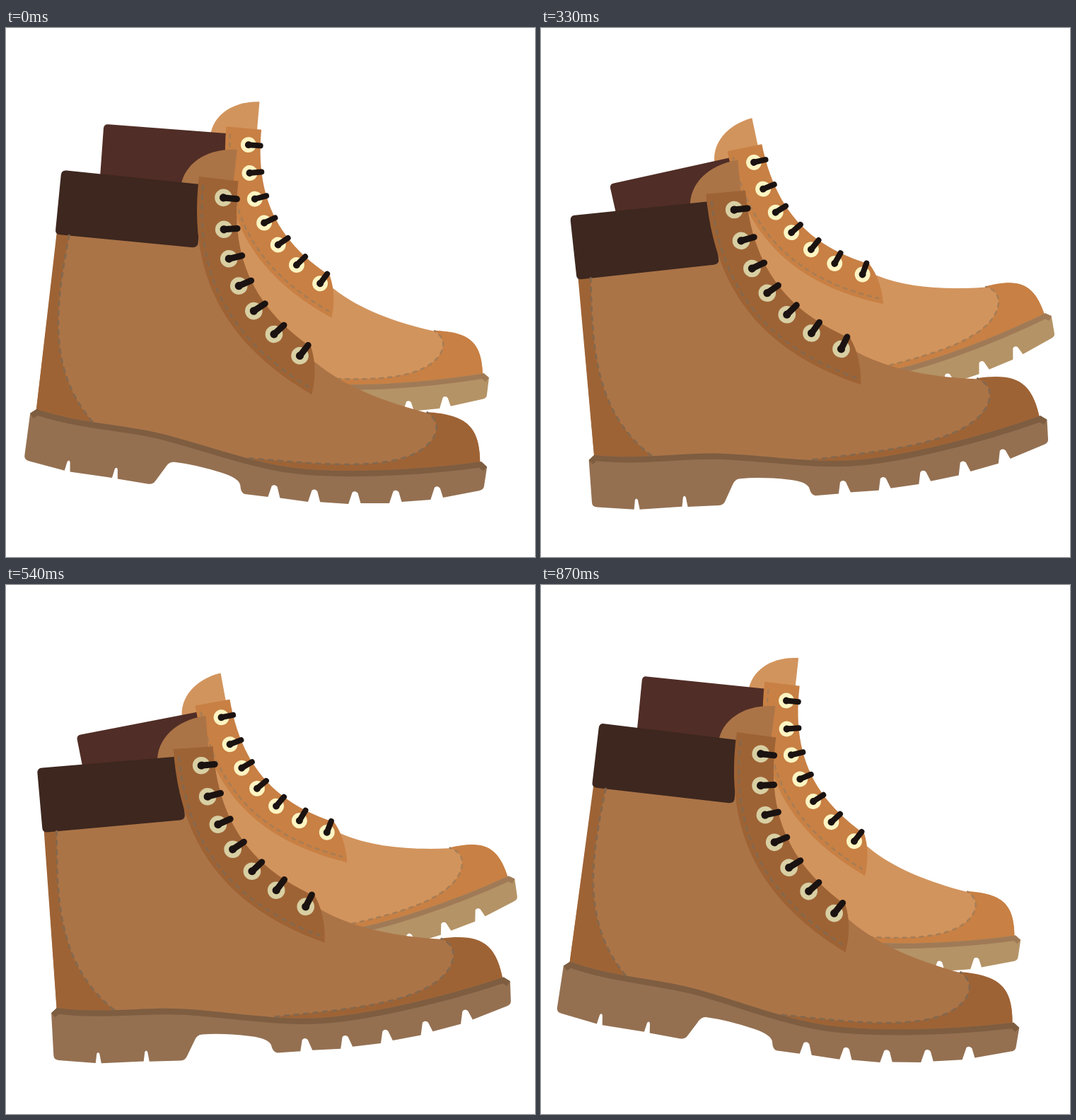
Animation, 748 px wide and 748 px high, one loop 900 ms. Source, as an HTML page with a canvas:

```html
<!DOCTYPE html>
<html lang="en">
<head>
<meta charset="utf-8">
<title>Walking boots</title>
<style>
html, body { margin: 0; width: 100%; height: 100%; overflow: hidden; background: #fff; }
canvas { display: block; width: 100vw; height: 100vh; }
</style>
</head>
<body>
<canvas id="stage" width="748" height="748"></canvas>
<script>
const ctx = document.getElementById('stage').getContext('2d');
const PIVOT = { x: 374.6, y: 415.5 };
const LACE = '#1b1311';
const EYELETS = 7;

// Point on the eyelet line, pushed sideways by a distance.
function eyeletLine(t, side = 0) {
  const [a, b, c, d] = [[283, 252], [292, 345], [334, 411], [423, 457]];
  const u = 1 - t;
  const [x, y] = [0, 1].map(k =>
    u * u * u * a[k] + 3 * u * u * t * b[k] + 3 * u * t * t * c[k] + t * t * t * d[k]);
  const [dx, dy] = [0, 1].map(k =>
    u * u * (b[k] - a[k]) + 2 * u * t * (c[k] - b[k]) + t * t * (d[k] - c[k]));
  const len = Math.hypot(dx, dy);
  return [x + side * dy / len, y - side * dx / len];
}

function traceParallel(path, side, from, to, steps = 24) {
  for (let i = 0; i <= steps; i++) {
    path.lineTo(...eyeletLine(from + (to - from) * i / steps, side));
  }
}

function makeStrip() {
  const path = new Path2D();
  traceParallel(path, 19, -0.09, 1.02);
  path.quadraticCurveTo(451, 471, ...eyeletLine(1.135, -37));
  traceParallel(path, -37, 1.135, -0.09);
  path.closePath();
  return path;
}

function makeStripSeam() {
  const path = new Path2D();
  traceParallel(path, -30, -0.055, 1.11);
  return path;
}

const ridge = 'M58 594L66 587C130 598 190 590 245 595S370 615 430 615S600 596 699 567L708 573';

// Treads sit on a parabola and tilt with its slope.
function makeSole() {
  let d = ridge + 'V601Q708 606 702 608';
  for (let i = 4; i >= 0; i--) {
    const x = 415 + 57 * i, y = 643 - 2 * i * i, slope = -0.07 * i;
    d += `L${x + 10} ${y + 17 + 10 * slope}L${x + 4} ${y + 2}` +
      `Q${x} ${y - 2} ${x - 4} ${y + 2}L${x - 7} ${y + 18 - 7 * slope}`;
  }
  d += 'L375 662Q369 661 367 651Q364 641 338 637Q300 631 270 632Q262 632 258 642L248 661Q245 668 238 668';
  for (const x of [190, 122]) {
    d += `L${x + 4} 667.5L${x + 2} 654Q${x} 650 ${x - 2} 654L${x - 4} 667`;
  }
  return new Path2D(d + 'L66 661Q59 660 59 654Z');
}

const heelSeam = 'C72 430 68 530 152 597';
const toeSeam = 'M373 611C480 604 595 600 625 548C634 530 629 517 612 509';
const toe = 'C670 504 690 519 698 571';

const shapes = {
  tongue: new Path2D('M221 245C221 212 250 186 292 182L295 260H235Z'),
  upper: new Path2D(`M58 330L260 300L300 380L446 463C490 490 550 504 612 510${toe}L440 621L200 597L66 595Z`),
  heel: new Path2D(`M57 330L75 336${heelSeam}L66 595Z`),
  toeCap: new Path2D(`${toeSeam}${toe}L530 612L440 621Z`),
  collar: new Path2D('M58 247L250 238L257 320Q258 327 250 328L62 338Q55 338 55 332L51 254Q51 247 58 247Z'),
  strip: makeStrip(),
  sole: makeSole()
};
const seams = [new Path2D(`M75 336${heelSeam}`), new Path2D(toeSeam), makeStripSeam()];
const ridgeLine = new Path2D(ridge);

const nearColors = {
  light: '#ab7447', dark: '#9e6335', collar: '#3d271f', sole: '#947051',
  welt: '#7e5d40', stitch: '#84684d', ring: '#d8cfa3'
};
const farColors = {
  light: '#d2945d', dark: '#c88044', collar: '#502d26', sole: '#b49366',
  welt: '#a07a56', stitch: '#a67d55', ring: '#fdf4c2'
};

function disc(x, y, radius, color) {
  ctx.fillStyle = color;
  ctx.beginPath();
  ctx.arc(x, y, radius, 0, 2 * Math.PI);
  ctx.fill();
}

function drawSole(colors) {
  ctx.save();
  ctx.fillStyle = colors.sole;
  ctx.fill(shapes.sole);
  ctx.clip(shapes.sole);
  ctx.strokeStyle = colors.welt;
  ctx.lineWidth = 16.5;
  ctx.stroke(ridgeLine);
  ctx.restore();
}

function drawLaces(ringColor) {
  ctx.lineCap = 'round';
  ctx.lineWidth = 9;
  ctx.strokeStyle = LACE;
  for (let i = 0; i < EYELETS; i++) {
    const [x, y] = eyeletLine(i / (EYELETS - 1));
    const angle = -(3 + 9.6 * i) * Math.PI / 180;
    disc(x, y, 12.3, ringColor);
    disc(x, y, 5.6, LACE);
    ctx.beginPath();
    ctx.moveTo(x, y);
    ctx.lineTo(x + 19 * Math.cos(angle), y + 19 * Math.sin(angle));
    ctx.stroke();
  }
}

function drawBoot(x, y, degrees, scale, colors) {
  const fill = (name, color) => {
    ctx.fillStyle = colors[color];
    ctx.fill(shapes[name]);
  };
  ctx.save();
  ctx.translate(x, y);
  ctx.rotate(degrees * Math.PI / 180);
  ctx.scale(scale, scale);
  ctx.translate(-PIVOT.x, -PIVOT.y);

  fill('tongue', 'light');
  fill('upper', 'light');
  fill('heel', 'dark');
  fill('toeCap', 'dark');
  fill('collar', 'collar');
  fill('strip', 'dark');

  ctx.strokeStyle = colors.stitch;
  ctx.lineWidth = 2.8;
  ctx.setLineDash([8, 5.5]);
  seams.forEach(seam => ctx.stroke(seam));
  ctx.setLineDash([]);

  drawSole(colors);
  drawLaces(colors.ring);
  ctx.restore();
}

function draw(now) {
  // Thirty steps per loop: fifteen tipping back, fifteen returning.
  const step = Math.floor((now % 900) / 30) + 1;
  const swing = 15 - Math.abs(15 - step);
  ctx.fillStyle = '#fff';
  ctx.fillRect(0, 0, 748, 748);
  drawBoot(405.9, 319.4, 8.55 - 1.525 * swing, 0.889, farColors);
  drawBoot(373.8, 415.2, 9.6 - 1.0667 * swing, 1, nearColors);
}

let start;
function tick(now) {
  start ??= now;
  draw(now - start);
  requestAnimationFrame(tick);
}
draw(0);
requestAnimationFrame(tick);
</script>
</body>
</html>
```
